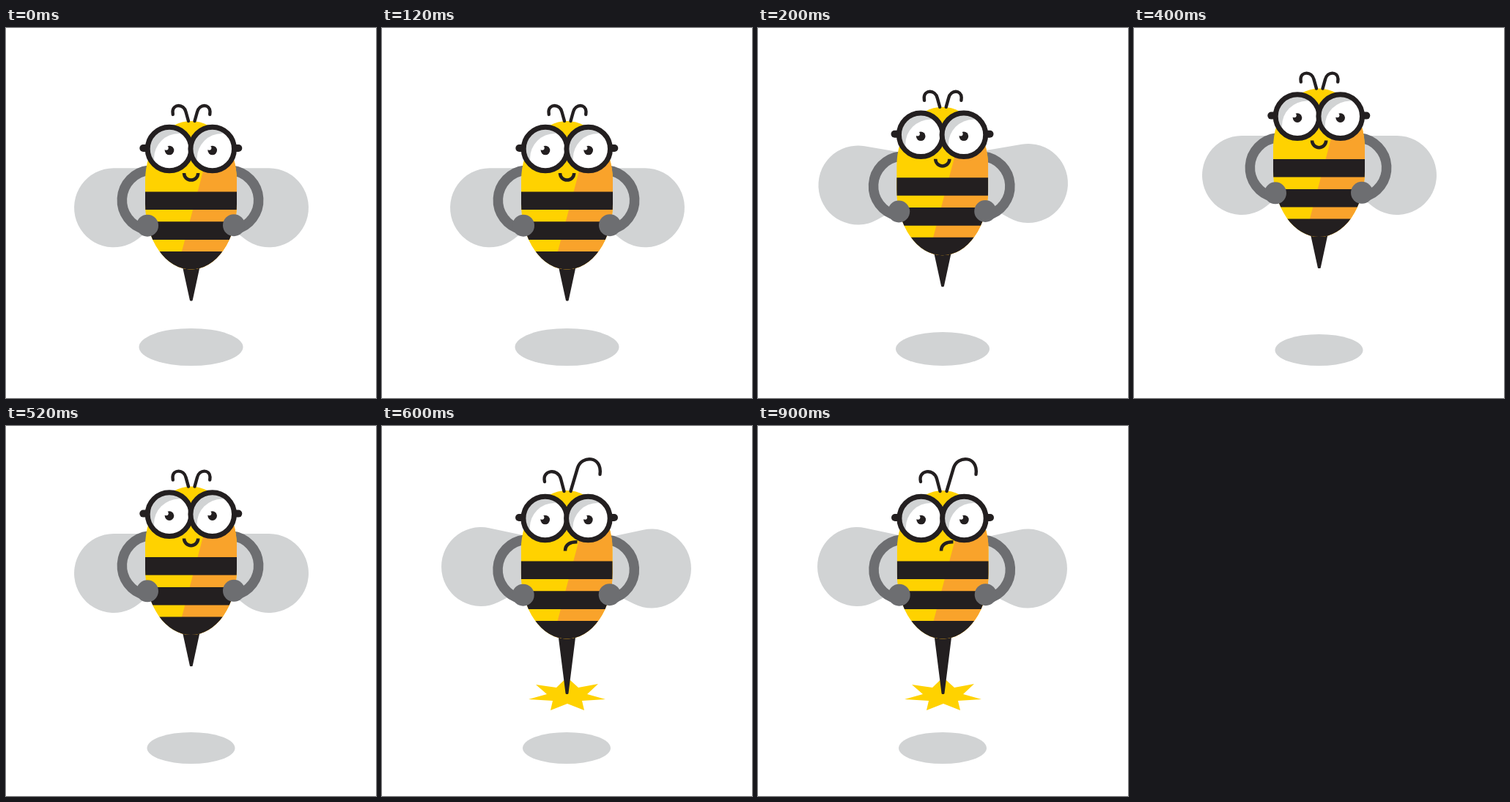
These frames come from a looping animation (505 by 505 pixels, 1100 ms). An HTML page:

```html
<!DOCTYPE html>
<html lang="en">
<head>
<meta charset="utf-8">
<title>Hovering bee</title>
<style>
  html, body { margin: 0; width: 100%; height: 100%; overflow: hidden; background: #fff; }
  svg { display: block; width: 100vw; height: 100vh; }
  .ink { fill: #231f20; }
  .line { fill: none; stroke: #231f20; stroke-width: 4.5; }
  .pale { fill: #d1d3d4; }
  .arm { fill: none; stroke: #6d6e71; stroke-width: 13.5; }
  .hand { fill: #6d6e71; }
  .feeler { stroke-width: 4.4; stroke-linecap: round; }
  .yellow { fill: #ffd200; }
  .orange { fill: #f9a32b; }
</style>
</head>
<body>
<svg viewBox="0 0 505 505">
  <defs>
    <clipPath id="torso"><path d="M190 208A62.5 81 0 0 1 315 208V240A62.5 89.5 0 0 1 190 240Z"/></clipPath>
    <clipPath id="lens"><circle r="28"/></clipPath>
    <path id="wing" class="pale" d="M0 -54H83A25 25 0 0 1 98.6 -9.4L33.6 42.3A54 54 0 1 1 0 -54Z"/>
    <g id="eye">
      <circle r="28" class="pale"/>
      <circle cx="13" cy="13" r="34" fill="#fff" clip-path="url(#lens)"/>
      <circle r="29.8" class="line" style="stroke-width:7"/>
      <circle cy="2" r="6.3" class="ink"/>
      <circle cx="-4.3" cy="-1.3" r="3" fill="#fff"/>
    </g>
  </defs>

  <ellipse id="shadow" class="pale"/>
  <use id="wingL" href="#wing"/>
  <use id="wingR" href="#wing"/>
  <path id="spark" class="yellow" d="M252.5 343L268 357L295 352L280 366L305 373L273 375L276 388L253 379L230 388L233 375L200 373L225 366L210 353L238 357Z"/>

  <g id="bee">
    <path class="arm" d="M195 194.3A41 41 0 0 0 190 275"/>
    <path class="arm" d="M308 194.3A41 41 0 0 1 313 275"/>
    <path id="sting" class="ink" stroke="#231f20" stroke-width="3" stroke-linejoin="round"/>
    <g clip-path="url(#torso)">
      <path class="yellow" d="M180 120H325V335H180Z"/>
      <path class="orange" d="M289 120H325V335H232Z"/>
      <path class="ink" d="M180 223.5H325V248H180ZM180 264.3H325V289H180ZM180 305H325V335H180Z"/>
    </g>
    <circle class="hand" cx="193" cy="269.7" r="15"/>
    <circle class="hand" cx="311" cy="269.2" r="15"/>
    <path id="feelers" class="line feeler"/>
    <rect class="ink" x="182.3" y="159" width="16" height="10" rx="5"/>
    <rect class="ink" x="306.3" y="159" width="16" height="10" rx="5"/>
    <use href="#eye" x="223" y="165"/>
    <use href="#eye" x="281.7" y="165"/>
    <path id="mouth" class="line"/>
  </g>
</svg>
<script>
const LOOP = 1100;

const calm = {
  feelers: "M249 127L245.5 114.5C242.5 103 228 103.5 227.5 114L227.8 118M257.5 127L261 114.5C264 103 278 103.5 278.5 114L278.2 118",
  mouth: "M243 198A9.6 9.6 0 0 0 262.2 198",
  tip: 371, spark: false
};
const stung = {
  feelers: "M248.8 128L244.3 111C240.3 96 218.3 99 222.3 115M257.8 128L267.3 96C272.3 79 301.3 79 297.8 105",
  mouth: "M250.3 209.5C250.3 200 258 197 266.8 197.3",
  tip: 403.5, spark: true
};

// move: body offset; left/right: wing centres; tilt: wing angle; shadow: cx, cy, rx, ry
const poses = [
  { at: 0, ...calm, move: [0, 0], left: [147, 245.3], right: [359, 245.3], tilt: 0, shadow: [252.5, 435.5, 71, 25.6] },
  { at: 200, ...calm, move: [-0.8, -19.2], left: [136.4, 214.5], right: [369, 212], tilt: 9.7, shadow: [252, 438, 64, 23] },
  { at: 400, ...calm, move: [0, -44.4], left: [147, 201], right: [359, 201], tilt: 0, shadow: [252.5, 439.5, 60, 21.6] },
  { at: 600, ...stung, move: [-0.3, -39], left: [135, 192], right: [368, 194.5], tilt: 12, shadow: [252, 439.5, 60, 21.6] }
];

const set = (id, attrs) => {
  const el = document.getElementById(id);
  for (const key in attrs) el.setAttribute(key, attrs[key]);
};

function draw(p) {
  const [cx, cy, rx, ry] = p.shadow;
  set("shadow", { cx, cy, rx, ry });
  set("bee", { transform: `translate(${p.move})` });
  set("wingL", { transform: `translate(${p.left}) rotate(${p.tilt})` });
  set("wingR", { transform: `translate(${p.right}) scale(-1 1) rotate(${p.tilt})` });
  set("feelers", { d: p.feelers });
  set("mouth", { d: p.mouth });
  set("sting", { d: `M242.5 326H263L253.3 ${p.tip}H252.3Z` });
  set("spark", { visibility: p.spark ? "visible" : "hidden" });
}

let shown;
function tick() {
  const t = performance.now() % LOOP;
  const pose = poses.findLast(p => p.at <= t);
  if (pose !== shown) draw(shown = pose);
  requestAnimationFrame(tick);
}
tick();
</script>
</body>
</html>
```
